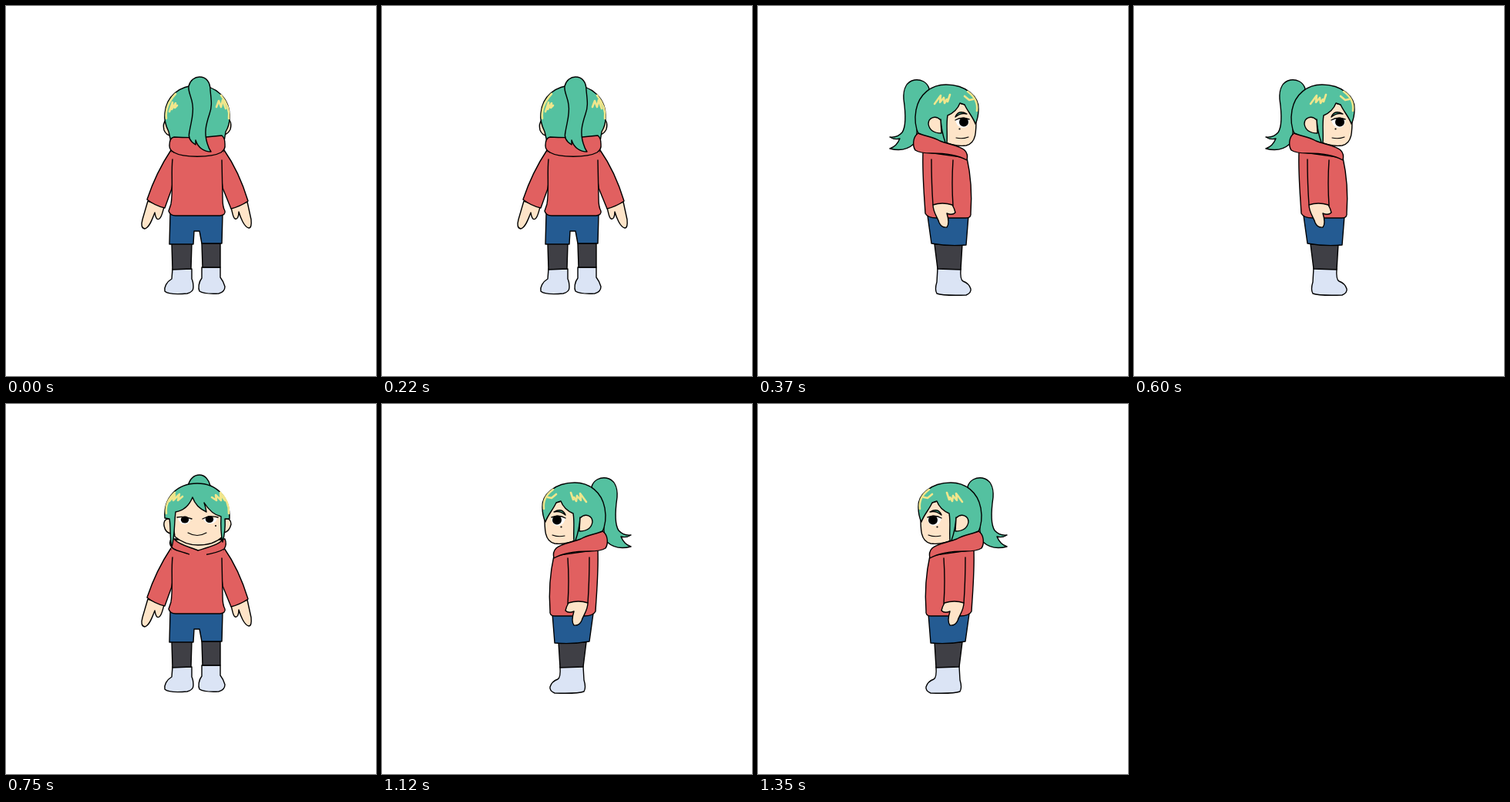
Write an HTML page that moves like this. It is 480x480 px and loops after 1.5 s.

```html
<!DOCTYPE html>
<html lang="en">
<head>
<meta charset="utf-8">
<title>Turnaround</title>
<style>
  html, body { margin: 0; width: 100%; height: 100%; overflow: hidden; background: #fff; }
  svg { display: block; width: 100%; height: 100%; }
  path { stroke: #000; stroke-width: 1.4; stroke-linejoin: round; stroke-linecap: round; }
  .hair { fill: #54c1a0; }
  .skin { fill: #fee4c8; }
  .top { fill: #e16060; }
  .shorts { fill: #245b92; }
  .legs { fill: #3f3f45; }
  .boots { fill: #dbe4f5; }
  .line { fill: none; }
  .thin { fill: none; stroke-width: 1.1; }
  .white { fill: #fff; stroke: none; }
  .dot { fill: #000; }
  .flat { stroke: none; }
  .shine { fill: none; stroke: #f0e68c; stroke-width: 2.6; }
</style>
</head>
<body>
<svg viewBox="0 0 480 480">
  <defs>
    <g id="body">
      <path class="skin" d="M184 253L177 277Q174 288 180 289C186 288 190 276 193 268C194 275 196 278 199 276C202 274 203 268 205 261Z"/>
      <path class="skin" d="M313 254L318 277Q319 288 315 288C309 287 304 274 302 267C302 274 300 277 297 276C294 274 294 268 292 262Z"/>
      <path class="boots" d="M216 341L215 354C208 358 205 365 206 370Q211 375 235 373Q243 371 243 365Q243 358 241 354L241 341Z"/>
      <path class="boots" d="M254 339L254 353C250 358 249 366 251 370Q257 374 276 373Q284 371 284 364Q282 357 278 352L278 339Z"/>
      <path class="legs" d="M215 308L216 342L240 341L241 308ZM254 308L255 339L278 339L278 308Z"/>
      <path class="shorts" d="M213 270L212 309L243 309L244 292L251 292L254 308L280 308L281 270Z"/>
      <path class="top" d="M214 187C202 205 190 230 183 251Q193 259 206 262L215 237L220 200Z"/>
      <path class="top" d="M283 187C297 207 307 230 314 253Q304 260 292 263L281 236L277 200Z"/>
      <path class="top flat" d="M214 186L216 200L215 255L211 266Q213 272 220 272L278 272Q285 271 284 266L281 255L280 200L283 186Z"/>
      <path class="line" d="M216 199C214 215 217 240 214 257L211 266Q213 272 220 272L278 272Q285 271 284 266Q281 261 281 250L280 200"/>
    </g>

    <g id="back">
      <use href="#body"/>
      <path class="skin" d="M207 148Q203 153 205 161Q208 168 214 168L213 150ZM290 148Q293 153 291 160Q288 166 283 167L284 150Z"/>
      <path class="hair" d="M214 176L211 163C207 155 205 147 206 139C208 117 225 103 248 103C273 103 291 120 290 145Q290 155 285 163L283 176Z"/>
      <path class="shine" d="M208 146Q206 129 220 114M289 146Q291 131 279 116M212 137L216 125L215 134L220 126L219 132L222 129M273 131L276 123L279 131L281 122L285 133"/>
      <path class="top" d="M218 170C213 171 212 176 212 181Q212 187 218 190C230 197 266 197 279 190Q285 186 284 179Q284 171 280 168Q250 172 218 170Z"/>
      <path class="hair" d="M237 104C239 96 245 92 251 92C260 92 265 99 265 109C266 121 268 129 264 140C259 155 257 165 261 178Q263 185 266 189C257 189 249 184 246 174L246 180C239 176 236 170 238 163C240 150 244 140 242 128C241 118 236 112 237 104Z"/>
    </g>

    <g id="front">
      <use href="#body"/>
      <path class="hair" d="M236 106C239 96 245 92 251 92C258 92 263 98 265 106Z"/>
      <path class="skin" d="M213 149Q204 148 205 158Q207 168 215 168ZM284 149Q292 148 292 156Q290 165 283 167Z"/>
      <path class="top" d="M214 175C211 181 213 187 222 190Q235 194 241 196L256 196Q275 193 283 188Q287 182 284 175Z"/>
      <path class="top flat" d="M238 193H260V199H238Z"/>
      <path class="skin" d="M219 176C225 183 240 186 249 190C262 186 275 183 281 176Z"/>
      <path class="skin" d="M215 140L219 172Q232 183 249 183Q270 183 281 172L284 140L250 115Z"/>
      <path class="white" d="M223 148H240Q239 156 231 156Q225 155 223 148ZM256 148H274Q272 156 264 155Q257 154 256 148Z"/>
      <ellipse class="dot" cx="232" cy="150" rx="5.2" ry="4.5"/>
      <ellipse class="dot" cx="264" cy="149.5" rx="5.2" ry="4.5"/>
      <circle class="dot" cx="272" cy="158" r="1"/>
      <path class="line" d="M222 147Q231 145 241 149M255 149Q264 144 275 147"/>
      <path class="thin" d="M236 167Q248 174 260 167"/>
      <path class="hair" d="M215 186C212 172 214 160 212 149L206 148C204 121 222 103 248 103C275 103 291 123 290 149L284 149Q285 165 281 179Q278 165 279 146C270 144 262 136 257 128Q259 134 260 140C251 136 245 130 242 121C238 131 232 138 220 140C218 157 219 172 215 186Z"/>
      <path class="shine" d="M208 142Q206 127 219 115M289 142Q290 127 278 115M212 126L219 118L217 125L225 117L223 125L229 120M267 121L273 125L272 118L279 125L278 117L284 125"/>
    </g>

    <g id="side">
      <path class="boots" d="M233 340L232 358Q229 368 232 373Q240 376 270 375Q277 372 276 367Q274 360 266 357Q262 355 263 341Z"/>
      <path class="legs" d="M229 309L233 341L263 342L265 309Z"/>
      <path class="shorts" d="M220 272L225 308Q247 312 270 310L273 272Z"/>
      <path class="top" d="M214 189C213 220 216 250 217 269Q220 275 232 275L270 275Q277 275 276 268C278 240 275 215 271 197Z"/>
      <path class="line" d="M225 199Q225 230 227 258M253 200Q251 230 253 259"/>
      <path class="skin" d="M227 258C227 268 233 274 235 281Q238 288 245 287Q249 282 245 269Q252 272 256 268Q255 263 252 258Q239 254 227 258Z"/>
      <path class="hair" d="M222 107C219 98 211 95 203 96C193 98 188 107 189 121C191 135 193 155 187 164Q181 171 171 170Q177 174 184 172Q180 182 171 185Q190 190 202 179C207 172 206 160 207 150Z"/>
      <path class="skin" d="M240 120L283 132C283 159 285 178 270 181Q256 183 238 175Z"/>
      <path class="white" d="M256 147Q265 144 274 147Q274 158 266 158Q257 157 256 147Z"/>
      <circle class="dot" cx="267" cy="150.5" r="6"/>
      <circle class="dot" cx="261.5" cy="159.5" r="1.1"/>
      <path class="line" d="M256 148Q264 143 274 147"/>
      <path class="thin" d="M257 171Q265 173 273 170"/>
      <path class="hair" d="M245 178Q220 178 209 168C204 158 203 146 205 135C209 114 225 102 244 102C270 102 287 118 286 134Q286 145 282 153C279 144 272 137 268 128L262 126C259 134 253 139 246 142C244 153 246 165 245 178Z"/>
      <path class="hair" d="M256 144Q260 134 271 140Q263 138 256 144Z"/>
      <path class="line" d="M237 147Q238 163 243 177"/>
      <path class="skin" d="M237 148C230 141 221 145 221 153Q223 165 238 165Z"/>
      <path class="shine" d="M229 127L237 116L236 125L241 119L242 126L245 121L246 124L249 115M268 117L274 122L279 121M272 111Q286 121 284 136"/>
      <path class="top" d="M208 165C201 169 200 181 204 187Q210 191 225 191C245 191 262 195 271 200Q273 192 268 187C262 181 245 179 236 175C226 169 216 169 208 165Z"/>
    </g>
  </defs>
  <g class="pose"><use href="#back"/></g>
  <g class="pose"><use href="#side"/></g>
  <g class="pose"><use href="#front"/></g>
  <g class="pose"><use href="#side" transform="matrix(-1 0 0 1 494 0)"/></g>
</svg>
<script>
  const LOOP = 1500;
  const STARTS = [0, 370, 750, 1120];
  const poses = document.querySelectorAll('.pose');

  function draw(now) {
    const time = now % LOOP;
    const current = STARTS.findLastIndex(start => time >= start);
    poses.forEach((pose, i) => { pose.style.display = i === current ? '' : 'none'; });
  }

  const origin = performance.now();
  function tick() {
    draw(performance.now() - origin);
    requestAnimationFrame(tick);
  }
  tick();
</script>
</body>
</html>
```
